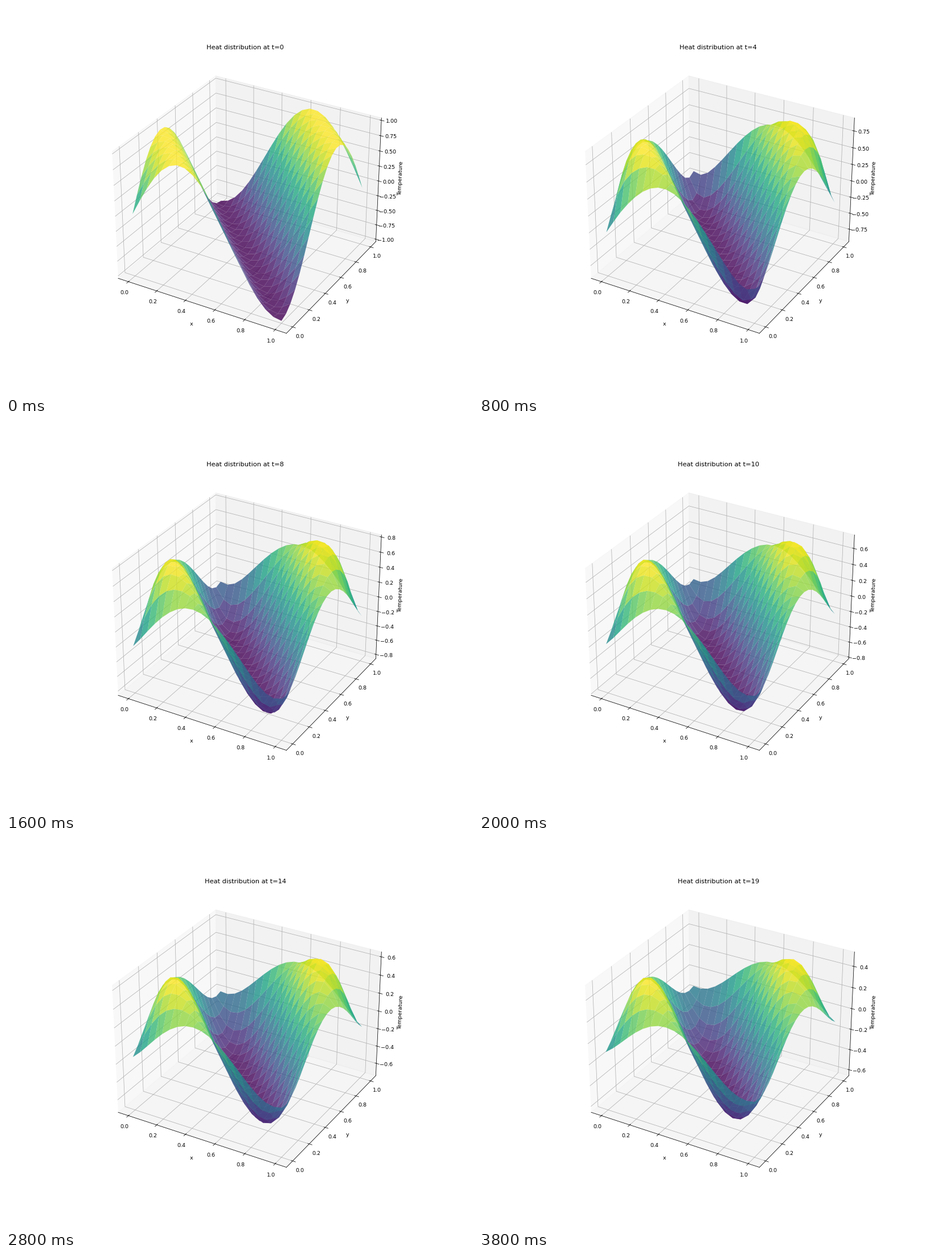
Recreate the animation shown at these times as a matplotlib script. Size 820 by 683 pixels, loop 4 s.

```python
import matplotlib.pyplot as plt
import numpy as np
from matplotlib.animation import FuncAnimation

W, H, DPI = 820, 683, 820 / 12
N, STEPS = 20, 20
DIFFUSIVITY = 0.01
WAVE = 4.75

x = np.linspace(0, 1, N)
X, Y = np.meshgrid(x, x)
dx = x[1] - x[0]
dt = 1 / (STEPS - 1)


def step(u):
    """One explicit Euler step with periodic edges."""
    lap = sum(np.roll(u, s, axis) for s in (-1, 1) for axis in (0, 1)) - 4 * u
    return u + DIFFUSIVITY * dt / dx**2 * lap


states = [np.sin(WAVE * (X + Y))]
for _ in range(STEPS - 1):
    states.append(step(states[-1]))


def padded(lo, hi):
    pad = (hi - lo) / 48
    return lo - pad, hi + pad


# the small excess keeps rounding from losing a pixel
fig = plt.figure(figsize=((W + 0.01) / DPI, (H + 0.01) / DPI), dpi=DPI)
ax = fig.add_subplot(111, projection="3d")


def draw(t):
    u = states[t]
    ax.clear()
    ax.plot_surface(X, Y, u, cmap="viridis", edgecolor="none", alpha=0.8)
    ax.set_xlim(*padded(-0.05, 1.05), view_margin=0)
    ax.set_ylim(*padded(-0.05, 1.05), view_margin=0)
    ax.set_zlim(*padded(u.min(), u.max()), view_margin=0)
    ax.set_xlabel("x")
    ax.set_ylabel("y")
    ax.set_zlabel("Temperature")
    ax.set_title(f"Heat distribution at t={t}")
    return []


anim = FuncAnimation(fig, draw, frames=STEPS, interval=200,
                     init_func=lambda: draw(0), repeat=True, repeat_delay=0)
plt.show()
```
